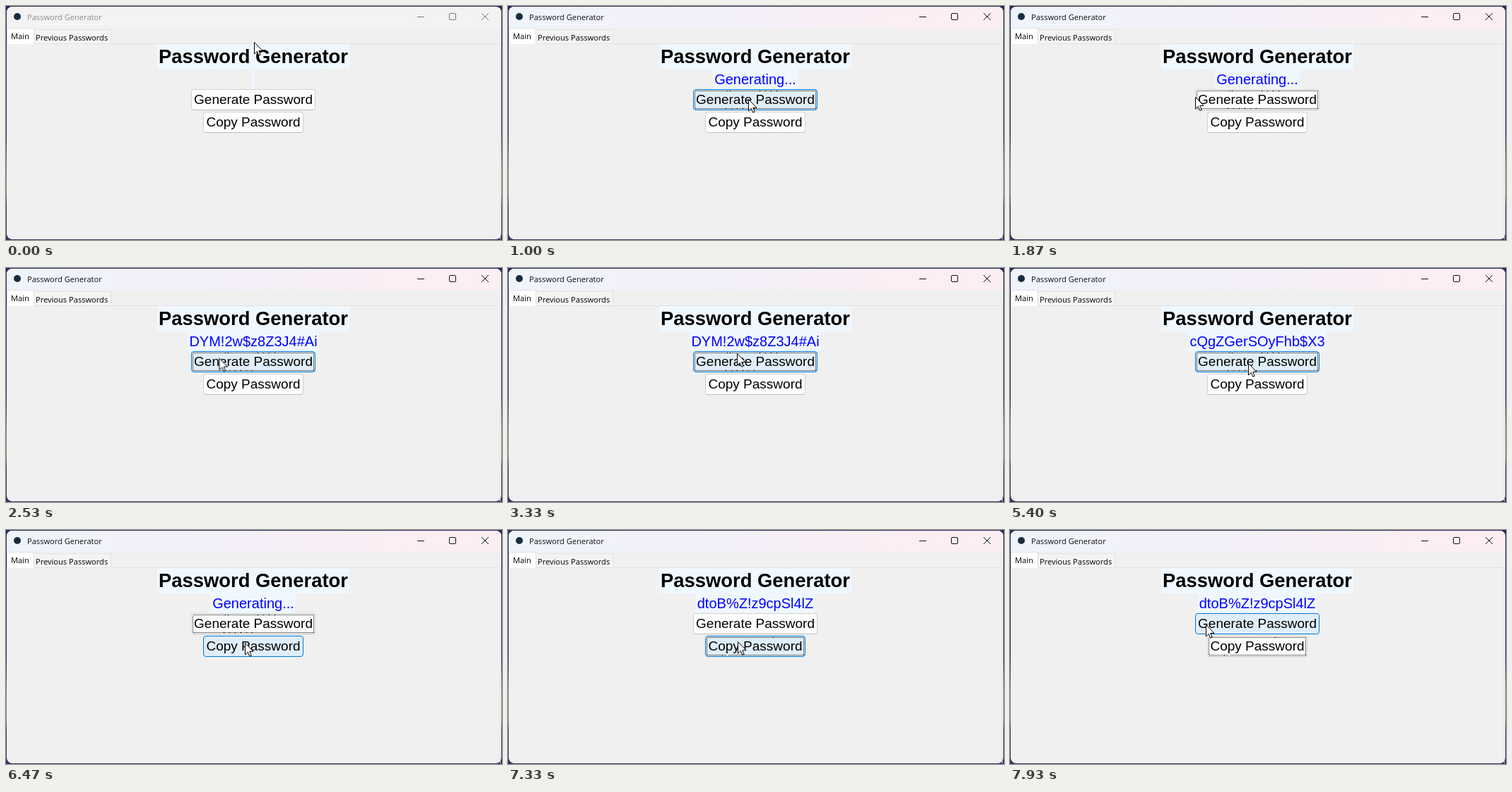
Animation of 702 by 332 pixels, one loop 8000 ms. Source, as an HTML page:

```html
<!DOCTYPE html>
<html lang="en">
<head>
<meta charset="utf-8">
<title>Password Generator</title>
<style>
  html, body { margin: 0; width: 100%; height: 100%; overflow: hidden; }
  body { background: #2b2a57; }
  .stage { position: relative; width: 702px; height: 332px; overflow: hidden;
    background: linear-gradient(#29285a 55%, #6d8370 68%, #7c8a72 80%, #34365c 86%); }
  .stage * { position: absolute; box-sizing: border-box; white-space: pre; }

  .window { left: 1px; top: 1px; width: 700px; height: 330px; border-radius: 8px;
    background: #f0f0f0; overflow: hidden; }
  .bar { left: 0; top: 0; width: 700px; height: 30px; background: #f3f3f3; }
  .bar.active { background: linear-gradient(90deg, #eff4fb, #f4f0fa 45%, #fdeef3 85%);
    animation: activate 8s step-end infinite; }
  .caption, .tab { font: 11.1px "Open Sans", sans-serif; }
  .caption { left: 30px; top: 1px; line-height: 30px; color: #8c8c8c;
    animation: darken 8s step-end infinite; }
  .controls { left: 0; top: 0; color: #777; animation: darken 8s step-end infinite; }
  .icon { left: 11px; top: 10px; width: 10px; height: 10px; border-radius: 50%; background: #182c3e; }

  .pane { left: 1px; top: 53px; width: 699px; height: 278px;
    border: solid #e2e2e2; border-width: 1px 1px 0 0; }
  .tab { border: 1px solid #e2e2e2; border-bottom: 0; color: #000; }
  .tab.main { left: 1px; top: 31px; width: 39px; height: 23px; padding-left: 5px;
    line-height: 21px; background: #fff; }
  .tab.previous { left: 39px; top: 33px; width: 110px; height: 20px; padding-left: 2px;
    line-height: 21px; background: #f4f4f4; }

  .label, .button { left: 350px; transform: translateX(-50%);
    font-family: "Liberation Sans", Arial, sans-serif; text-align: center; }
  .label { padding: 0 2px; background: #f0f8ff; }
  .heading { top: 54px; height: 36px; font-size: 27.4px; font-weight: bold; line-height: 36px; }
  .result { top: 90px; height: 28px; font-size: 20px; line-height: 28px; color: #00f;
    visibility: hidden; animation: 8s step-end infinite; }
  .empty { animation-name: empty; }
  .busy { animation-name: busy; }
  .first { animation-name: first; }
  .second { animation-name: second; }
  .third { animation-name: third; }

  .button { height: 30px; font-size: 19px; line-height: 28px; color: #000;
    border: 1px solid #d0d0d0; border-bottom-color: #bcbcbc; border-radius: 4px;
    background: #fdfdfd; animation: 8s step-end infinite; }
  .generate { top: 118px; width: 176px; animation-name: hover-generate; }
  .copy { top: 150px; width: 142px; animation-name: hover-copy; }
  .focus { left: 0; top: 0; overflow: visible; fill: none; stroke: #000; stroke-dasharray: 1 1;
    shape-rendering: crispEdges; visibility: hidden; animation: 8s step-end infinite; }
  .generate .focus { animation-name: focus-generate; }
  .copy .focus { animation-name: focus-copy; }

  .cursor { left: 0; top: 0; overflow: visible; animation: move 8s linear infinite; }

  @keyframes activate { 0% { visibility: hidden } 12.5%, 100% { visibility: visible } }
  @keyframes darken { 12.5%, 100% { color: #111 } }

  @keyframes empty { 0% { visibility: visible } 12.5%, 100% { visibility: hidden } }
  @keyframes busy {
    0%, 31.25%, 62.5%, 87.5%, 100% { visibility: hidden }
    12.5%, 46.25%, 72.5% { visibility: visible }
  }
  @keyframes first { 0%, 46.25%, 100% { visibility: hidden } 31.25% { visibility: visible } }
  @keyframes second { 0%, 72.5%, 100% { visibility: hidden } 62.5% { visibility: visible } }
  @keyframes third { 0% { visibility: hidden } 87.5%, 100% { visibility: visible } }

  @keyframes hover-generate {
    0%, 21.9%, 51.8%, 76.1% { background: #fdfdfd; border-color: #d0d0d0 #d0d0d0 #bcbcbc }
    8%, 25.2%, 61.4%, 94.1%, 100% { background: #e0eef9; border-color: #0078d4 }
  }
  @keyframes hover-copy {
    0%, 93.6%, 100% { background: #fdfdfd; border-color: #d0d0d0 #d0d0d0 #bcbcbc }
    76.7% { background: #e0eef9; border-color: #0078d4 }
  }
  @keyframes focus-generate { 0%, 89%, 100% { visibility: hidden } 12.5% { visibility: visible } }
  @keyframes focus-copy { 0% { visibility: hidden } 89%, 100% { visibility: visible } }

  @keyframes move {
    0%, 3% { transform: translate(351px, 51px) }
    9%, 15% { transform: translate(340px, 132px) }
    22%, 25% { transform: translate(262px, 129px) }
    31% { transform: translate(300px, 128px) }
    41.6% { transform: translate(324px, 121px) }
    46% { transform: translate(324px, 124px) }
    50% { transform: translate(323px, 122px) }
    56.6%, 59% { transform: translate(322px, 107px) }
    65% { transform: translate(336px, 134px) }
    67.5% { transform: translate(337px, 135px) }
    73% { transform: translate(337px, 136px) }
    79% { transform: translate(338px, 159px) }
    80.9% { transform: translate(338px, 160px) }
    90% { transform: translate(338px, 165px) }
    96% { transform: translate(290px, 140px) }
    99.1%, 100% { transform: translate(277px, 134px) }
  }
</style>
</head>
<body>
<div class="stage">
  <div class="window">
    <div class="bar"></div>
    <div class="bar active"></div>
  </div>
  <div class="icon"></div>
  <div class="caption">Password Generator</div>
  <svg class="controls" width="702" height="30" fill="none" stroke="currentColor">
    <path d="M582 15.5h10M673 10l10 10M683 10l-10 10"/>
    <rect x="627.5" y="10.5" width="9" height="9" rx="1.5"/>
  </svg>

  <div class="pane"></div>
  <div class="tab previous">Previous Passwords</div>
  <div class="tab main">Main</div>

  <div class="label heading">Password Generator</div>
  <div class="label result empty"></div>
  <div class="label result busy">Generating...</div>
  <div class="label result first">DYM!2w$z8Z3J4#Ai</div>
  <div class="label result second">cQgZGerSOyFhb$X3</div>
  <div class="label result third">dtoB%Z!z9cpSl4lZ</div>

  <div class="button generate"><svg class="focus" width="174" height="28"><rect x="1.5" y="1.5" width="171" height="25"/></svg>Generate Password</div>
  <div class="button copy"><svg class="focus" width="140" height="28"><rect x="1.5" y="1.5" width="137" height="25"/></svg>Copy Password</div>

  <svg class="cursor" width="14" height="21">
    <path d="M.5 .5V17L4.3 13.4L6.8 19.2L9.2 18.2L6.8 12.4H12Z" fill="#fff" stroke="#000"/>
  </svg>
</div>
</body>
</html>
```
